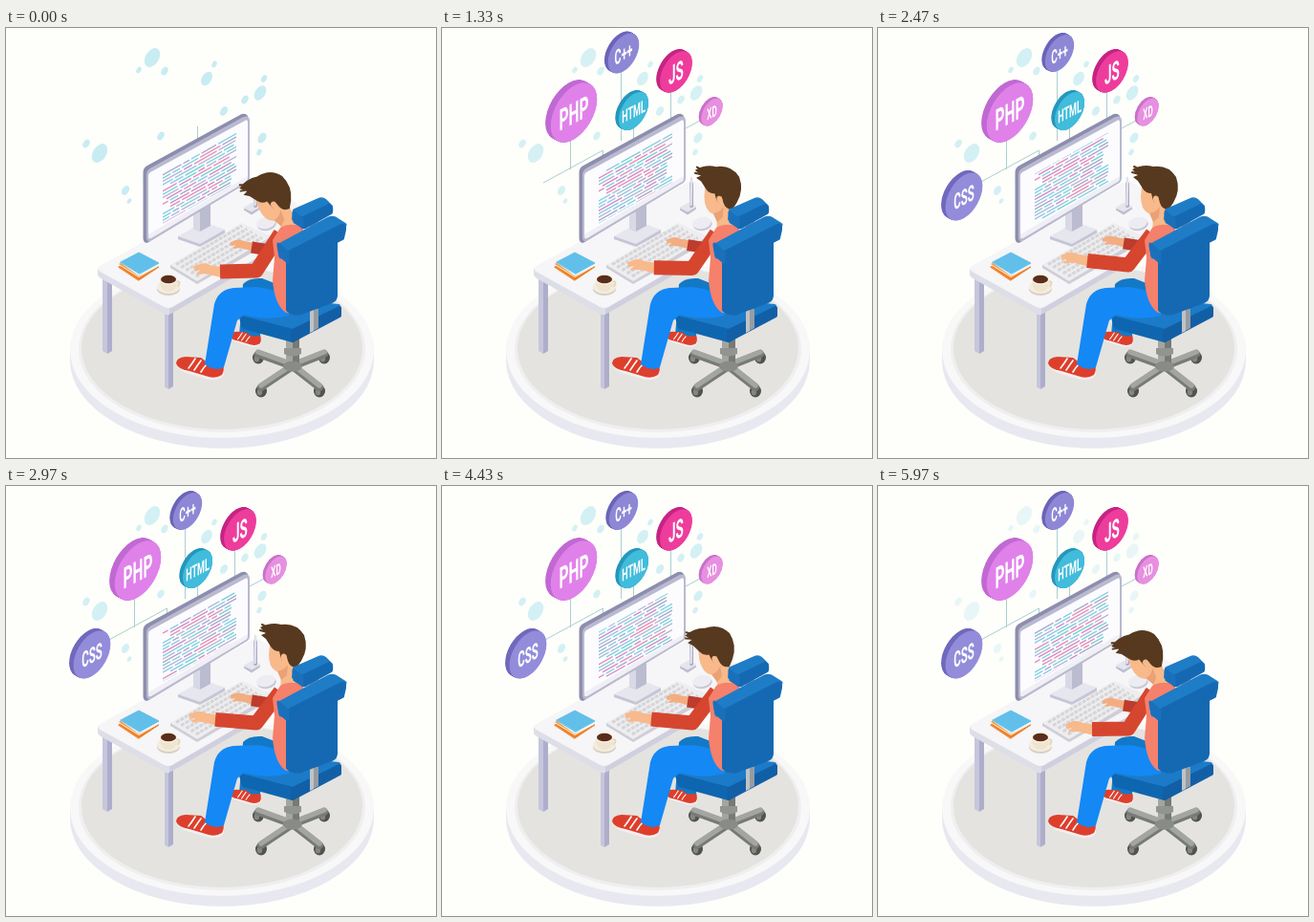
An HTML page with a canvas that plays this animation: 450x450 px, repeating every 6.01 s.

```html
<!DOCTYPE html>
<html lang="en">
<head>
<meta charset="utf-8">
<title>Developer at work</title>
<style>
html, body { margin: 0; width: 100%; height: 100%; overflow: hidden; background: #fefefb; }
canvas { display: block; width: 450px; height: 450px; }
</style>
</head>
<body>
<canvas id="stage" width="450" height="450"></canvas>
<script>
const ctx = document.getElementById('stage').getContext('2d');
const LOOP = 6010;

const clamp = v => Math.max(0, Math.min(1, v));
const smooth = (t, a, b) => { const p = clamp((t - a) / (b - a)); return p * p * (3 - 2 * p); };
const backOut = p => p <= 0 ? 0 : p >= 1 ? 1 : 1 + 2.70158 * (p - 1) ** 3 + 1.70158 * (p - 1) ** 2;

function shape(color, d, round = 0) {
  const p = new Path2D(d);
  ctx.fillStyle = color;
  ctx.fill(p);
  if (round) {
    ctx.strokeStyle = color;
    ctx.lineWidth = round;
    ctx.lineJoin = 'round';
    ctx.stroke(p);
  }
}

function line(color, width, d, cap = 'round') {
  ctx.strokeStyle = color;
  ctx.lineWidth = width;
  ctx.lineCap = cap;
  ctx.lineJoin = 'round';
  ctx.stroke(new Path2D(d));
}

function oval(color, x, y, rx, ry, turn = 0) {
  ctx.fillStyle = color;
  ctx.beginPath();
  ctx.ellipse(x, y, rx, ry, turn, 0, Math.PI * 2);
  ctx.fill();
}

function seeded(seed) {
  return () => (seed = (seed * 16807) % 2147483647) / 2147483647;
}

function platform() {
  oval('#e8e8f0', 226, 348, 159, 92);
  ctx.fillStyle = '#e8e8f0';
  ctx.fillRect(67, 337, 318, 11);
  oval('#f8f8f8', 226, 337, 159, 92);
  oval('#efeff1', 226, 336, 150, 87);
  oval('#e4e3df', 226, 335, 147, 85);
}

// x, y, radius of the pale spots behind the badges
const spots = [
  [153, 31, 9], [139, 44, 3], [166, 45, 4], [210, 53, 6.5], [218, 38, 3],
  [266, 68, 7], [270, 53, 3.5], [228, 87, 4.5], [250, 75, 4], [98, 131, 9],
  [84, 121, 4], [125, 170, 4.5], [129, 181, 2.5], [162, 113, 4], [268, 115, 5], [265, 130, 3]
];

function drawSpots(t) {
  ctx.globalAlpha = t < 1500 ? 1 - .5 * smooth(t, 0, 700) + .3 * smooth(t, 800, 1500)
                             : .8 - .4 * smooth(t, 5250, 5970);
  for (const [x, y, r] of spots) oval('#c8ecf2', x, y, r * .78, r * 1.2, .55);
  ctx.globalAlpha = 1;
}

// Connector growing from (x1, y1) to (x2, y2)
function stem(t, x1, y1, x2, y2, start, end) {
  const p = smooth(t, start, end);
  if (p > 0) line('#a8cfcf', 1, `M${x1} ${y1}L${x1 + (x2 - x1) * p} ${y1 + (y2 - y1) * p}`, 'butt');
}

function drawStems(t) {
  stem(t, 200.5, 122, 200.5, 103, -600, 0);
  stem(t, 187.5, 118, 187.5, 42, 50, 700);
  stem(t, 239.5, 96, 239.5, 62, 200, 650);
  stem(t, 255, 105, 270, 97, 100, 500);
  stem(t, 134.5, 148, 134.5, 112, 300, 750);
  stem(t, 168.5, 140, 168.5, 128, 150, 400);
  stem(t, 168.5, 128, 106, 162, 350, 1200);
}

const badges = [
  { text: 'C++',  x: 190, y: 26.5, r: 17.5, size: 20, face: '#8e87d6', side: '#6b64b8', start: 900 },
  { text: 'HTML', x: 200.5, y: 87, r: 18,  size: 18, face: '#41bcdb', side: '#2597bd', start: 608 },
  { text: 'JS',   x: 245, y: 46,  r: 19.5, size: 27, face: '#ee3c9c', side: '#c52482', start: 644 },
  { text: 'XD',   x: 282.5, y: 88, r: 13,  size: 16, face: '#e78fe0', side: '#c972c8', start: 410 },
  { text: 'PHP',  x: 138, y: 88.5, r: 28,  size: 31, face: '#e081ea', side: '#c169d2', start: 626 },
  { text: 'CSS',  x: 90, y: 176.5, r: 22.4, size: 23, face: '#938cda', side: '#7069bd', start: 1805 }
];

function drawBadge(b, t) {
  const s = backOut((t - b.start) / 600);
  if (s <= 0) return;
  ctx.save();
  ctx.translate(b.x, b.y);
  ctx.scale(s, s);
  const disc = (color, dx) => {
    ctx.save();
    ctx.transform(.866, -.5, 0, 1, -dx, -dx * .55);
    oval(color, 0, 0, b.r, b.r);
    ctx.restore();
  };
  for (let d = b.r * .2; d > 0; d -= .5) disc(b.side, d);
  disc(b.face, 0);
  ctx.transform(.5, -.26, 0, 1, 0, 0);
  ctx.font = `bold ${b.size}px Roboto, "Liberation Sans", sans-serif`;
  ctx.textAlign = 'center';
  ctx.textBaseline = 'alphabetic';
  ctx.fillStyle = '#fff';
  ctx.fillText(b.text, 0, b.size * .37);
  ctx.restore();
}

function desk() {
  shape('#c6c6dc', 'M101 258H106V341L101 338Z');
  shape('#aeaecc', 'M106 258H111V338L106 341Z');
  shape('#c6c6dc', 'M166 296H170V378L166 376Z');
  shape('#aeaecc', 'M170 296H175V375L170 378Z');
  shape('#cfcfdf', 'M98 258L167 297Q171 299 175 296L330 206V200L170 285L98 252Z', 3);
  shape('#dedee8', 'M96 253V258Q96 260 99 262L165 299Q169 301 171 300V290Z');
  shape('#f6f5f7', 'M99 250L262 160L331 200L174 291Q170 293 166 291L99 254Q96 252 99 250Z', 2);
}

const rand = seeded(41);
const inks = ['#e58ab2', '#6fcfd2', '#a5a5c9', '#d584c4', '#8ac6e6', '#7fcfe0', '#b4b4d0'];
const code = Array.from({ length: 18 }, () => {
  const row = [];
  let x = 15 + Math.floor(rand() * 3) * 4;
  while (x < 86) {
    const w = Math.min(5 + rand() * 20, 92 - x);
    row.push([x, w, inks[Math.floor(rand() * inks.length)]]);
    x += w + 2;
  }
  return row;
});

function monitor(t) {
  // foot and neck
  shape('#c5c5d6', 'M180 218V221L203 229L229 215V211Z');
  shape('#e6e6ef', 'M180 218L207 203L229 211L203 226Z');
  shape('#bcbcd0', 'M196 190L214 180V207L203 213L196 210Z');
  shape('#d9d9e6', 'M196 190L203 193V213L196 210Z');

  shape('#8d8dae', 'M145 151Q145 147 149 145L246 92Q251 90 252 94V160L148 223Q145 224 145 220Z', 3);
  shape('#b9b9d0', 'M148 154Q148 150 151 148L249 94Q254 92 254 97V157Q254 160 251 162L151 222Q148 223 148 219Z', 2);
  shape('#fcfcfe', 'M149 155Q149 152 151 151L250 97Q253 95 253 99V156L149 217Z');
  shape('#efeff5', 'M149 216L253 155V157Q253 160 251 161L152 220Q149 221 149 219Z');

  ctx.save();
  ctx.transform(1, -.56, 0, 1, 149, 155);
  ctx.beginPath();
  ctx.rect(12, 6, 82, 52);
  ctx.clip();
  const gap = 3.4, span = gap * code.length, shift = span * t / LOOP;
  code.forEach((row, i) => {
    const y = 3 + (i * gap - shift + span) % span;
    for (const [x, w, ink] of row) {
      ctx.fillStyle = ink;
      ctx.fillRect(x, y, w, 1.5);
    }
  });
  ctx.restore();
}

function deskItems() {
  // keyboard
  shape('#cfcdd6', 'M172 248V251L200 268L284 220V216Z');
  shape('#eeedef', 'M172 248L247 204L278 218L200 265Z');
  ctx.setLineDash([4, 1.2]);
  for (let i = 0; i < 5; i++) {
    const x = 178 + i * 5.2, y = 247.5 + i * 3.1;
    line('#d6d5d8', 3.1, `M${x} ${y}L${x + 69} ${y - 40.5}`, 'butt');
  }
  ctx.setLineDash([]);

  // mouse
  oval('#c9c9d5', 273, 206, 10, 6, -.2);
  oval('#ececf2', 272, 204, 10, 6, -.2);

  // pen in its holder
  shape('#bdbdce', 'M249 190L258 185L266 189L257 195Z', 1);
  shape('#e5e5ee', 'M249 188L258 183L266 187L257 192Z', 1);
  line('#a9a9c0', 4, 'M261 186V163');
  line('#e2e2ee', 2.5, 'M260.5 185L261 157');

  // books
  shape('#ee7f25', 'M118 250L139 238L160 250L139 264Z', 1);
  shape('#fff4e5', 'M118 248L139 237L160 249L139 261Z');
  shape('#f49b3e', 'M118 247L139 236L159 248L139 260Z');
  shape('#e8f6fb', 'M120 246L139 235L160 247V249L139 259.5Z');
  shape('#62bfea', 'M120 245L139 235L160 246L140 257Z', 1);

  // coffee
  oval('#d7cfc5', 170, 273, 12, 7);
  oval('#f4eddd', 170, 271, 12, 7);
  shape('#efe4cf', 'M161 263Q161 276 170 276Q179 276 179 263Z');
  line('#e5d8ba', 2, 'M178 265Q184 265 180 270');
  oval('#faf3e2', 170, 263, 9.5, 5.5);
  oval('#5a2d1d', 170, 263, 8, 4.3);
}

function shoe(x, y, s) {
  ctx.save();
  ctx.translate(x, y);
  ctx.scale(s, s);
  shape('#f6eef0', 'M0 6Q2 13 14 16L35 22Q47 23 50 17V12H5Z');
  shape('#dd3f2c', 'M0 5Q0 -1 10 -2L26 -1L34 5L49 5Q51 12 48 17Q42 21 34 19L14 13Q2 11 0 5Z');
  line('#fff', 1.6, 'M13 10Q17 5 20 0M19 12Q23 6 26 2M26 14Q29 9 32 6');
  ctx.restore();
}

function farLeg() {
  shape('#1379c6', 'M248 268Q254 261 268 262L294 272L292 291L268 293L266 323Q254 328 244 322L247 285Z');
  shoe(234, 319, .66);
}

function nearLeg() {
  shoe(178, 346, 1);
  shape('#1488f5', 'M208 352L218 289Q222 274 238 272L262 271Q283 273 296 284V301Q272 307 249 300L242 306L228 355Q219 360 208 352Z');
}

function chairBase() {
  const ends = [[264, 341], [333, 341], [267, 376], [328, 376]];
  for (const [x, y] of ends) {
    oval('#50534f', x, y + 4, 6, 6.5);
    oval('#84877f', x - 1.5, y + 5, 2.7, 3.5);
  }
  for (const [x, y] of ends) {
    line('#777a76', 8, `M300 354L${x} ${y}`);
    line('#a3a5a1', 5.5, `M300 352L${x} ${y - 2}`);
  }
  shape('#777a76', 'M293 320H307V354Q300 359 293 354Z');
  shape('#a3a5a1', 'M293 320H300V356L293 354Z');
  oval('#888b86', 300, 354, 10, 5.5);
  shape('#92958f', 'M291 335H309V341Q300 346 291 341Z');
}

function seat() {
  shape('#1b7bc8', 'M246 301L281 284L348 291L300 315Z', 4);
  shape('#0f66b0', 'M246 303L300 317V327L249 313Z', 4);
  shape('#125fa6', 'M300 317L349 293V301L300 327Z', 4);
}

function chairBack() {
  shape('#979ca2', 'M318 294H327V314L318 319Z');
  shape('#bfc3c6', 'M318 294H322V317L318 319Z');
  shape('#979ca2', 'M318 200H327V220H318Z');
  shape('#1569b2', 'M295 243L345 219V280Q345 284 341 286L309 298Q301 300 295 295Z', 4);
  shape('#1f7cc6', 'M286 228L338 200Q342 198 346 201L354 206L297 235L288 239Z', 5);
  shape('#1569b2', 'M296 235L351 207Q355 206 354 211L352 220L301 246Q295 247 295 241Z', 4);
  shape('#1a70ba', 'M285 226L295 235V245L287 238Z', 3);
  shape('#1f7cc6', 'M302 191L327 180Q331 178 334 181L340 187L311 202L301 200Z', 4);
  shape('#1569b2', 'M311 199L338 186Q341 187 340 193L313 208Q309 209 309 204Z', 4);
  shape('#1a70ba', 'M301 193L310 200V208L302 203Z', 3);
}

function head(t) {
  const bow = 1 - smooth(t, 0, 1530) + smooth(t, 3700, 5170);
  ctx.save();
  ctx.translate(288 + bow, 205 + bow * 4.5);
  ctx.rotate(-bow * 26 * Math.PI / 180);
  ctx.translate(-288, -205);
  shape('#f8b98b', 'M277 159L275 176Q275 190 283 194L288 195L287 216L304 213L305 182L299 160Z');
  shape('#eaa175', 'M284 194Q291 193 295 187L294 198L288 203Z');
  shape('#57391f', 'M266 148Q277 142 288 145Q304 143 312 156Q317 170 309 183L304 190Q297 190 295 183L293 176L289 183Q287 178 286 173Q280 173 277 168L272 160L267 156L272 154Z');
  line('#57391f', 2, 'M279 151L268 145M277 154L266 151');
  oval('#f8b98b', 291, 180, 3, 4.5, -.2);
  ctx.restore();
}

function hand(x, y, s, skin) {
  ctx.save();
  ctx.translate(x, y);
  ctx.scale(s, s);
  shape(skin, 'M2 -5L-11 -7Q-17 -10 -22 -9L-30 -6Q-32 -3 -28 -3L-21 -4L-25 0Q-25 3 -21 2L-14 3L2 7Z');
  line(skin, 2.5, 'M-18 -4L-29 -2M-16 0L-26 2');
  ctx.restore();
}

const armDrop = t => 1 - smooth(t, 850, 1900) + smooth(t, 5250, 5970);
const tap = (t, phase) => Math.sin(t / LOOP * Math.PI * 38 + phase) * .6;

function farArm(t) {
  const y = 224 + armDrop(t) * 4 + tap(t, 2);
  hand(258, y, .76, '#f3ad80');
  line('#bd3c2b', 12, `M288 222L276 ${y + 4}L257 ${y + 1}`, 'butt');
}

function nearArm(t) {
  const drop = armDrop(t);
  const x = 220 + drop * 5, y = 244 + drop * 11 + tap(t, 0);
  hand(x, y, .94, '#f8b98b');
  line('#d6462f', 15, `M287 215L262 ${248 + drop * 6}L${x - 1} ${y}`, 'butt');
}

function draw(t) {
  ctx.fillStyle = '#fefefb';
  ctx.fillRect(0, 0, 450, 450);
  platform();
  drawSpots(t);
  drawStems(t);
  for (const b of badges) drawBadge(b, t);
  desk();
  monitor(t);
  deskItems();
  chairBase();
  farLeg();
  farArm(t);
  seat();
  head(t);
  nearLeg();
  nearArm(t);
  shape('#f5806c', 'M287 209Q297 203 311 208L312 298L293 298Q281 290 279 264L281 240L279 222Z');
  chairBack();
}

const begin = performance.now();
function tick() {
  draw((performance.now() - begin) % LOOP);
  requestAnimationFrame(tick);
}
tick();
</script>
</body>
</html>
```
